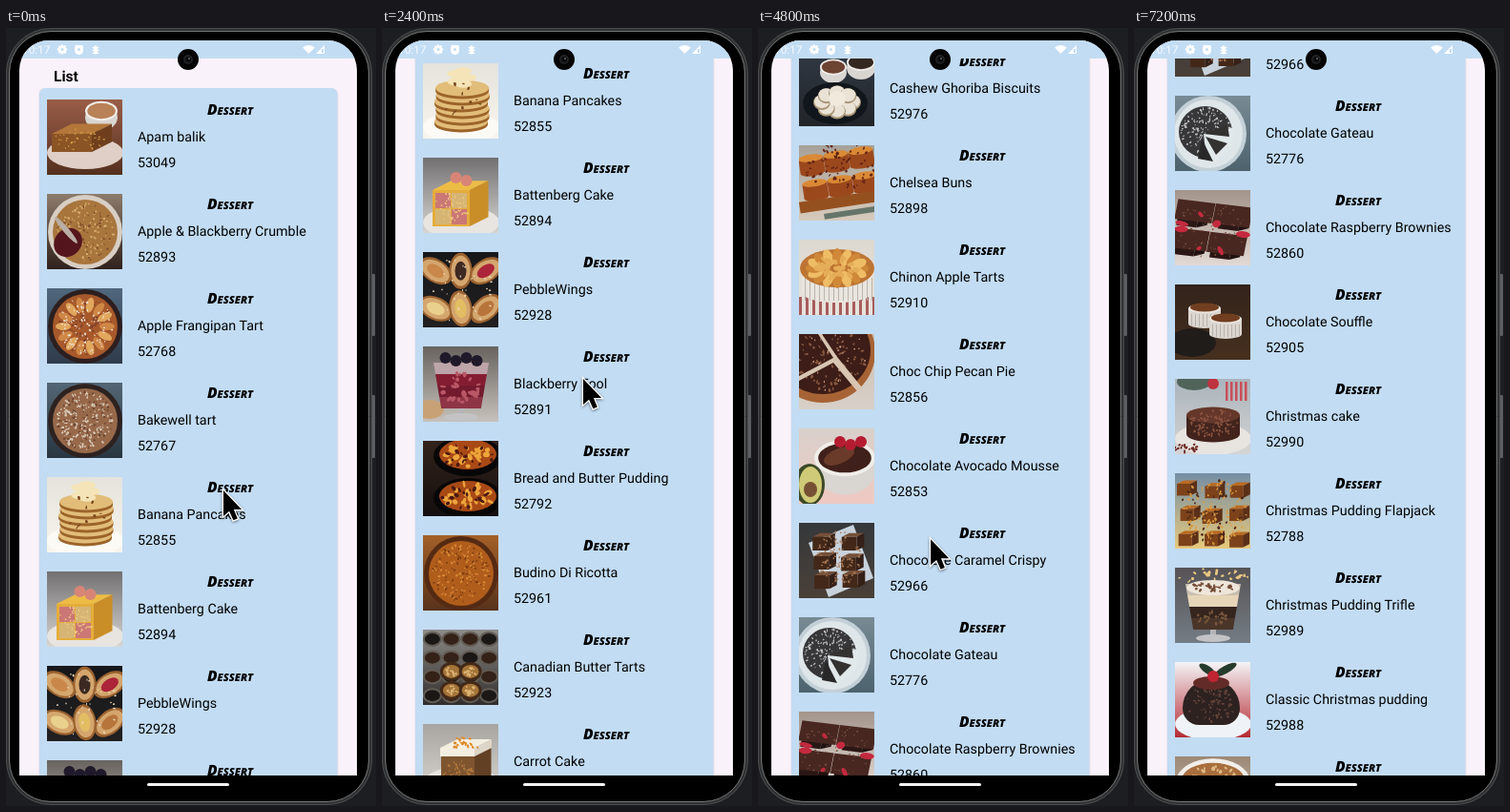
Animation, 388 px wide and 816 px high, one loop 7800 ms. Source, as an HTML page with a canvas:

```html
<!DOCTYPE html>
<html lang="en">
<head>
<meta charset="utf-8">
<title>Dessert list</title>
<style>
  html, body { margin: 0; width: 100%; height: 100%; overflow: hidden; background: #1d1e21; }
  canvas { display: block; }
</style>
</head>
<body>
<canvas id="stage" width="388" height="816"></canvas>
<script>
const ctx = document.getElementById('stage').getContext('2d');
const LOOP = 7800, STEP = 200, LAST = 7200;
const PITCH = 99, PHOTO = 79, BLUE = '#c2dcf3', WHITE = '#fff';

// Basic shapes
function box(x, y, w, h, color, r = 0) {
  ctx.fillStyle = color;
  ctx.beginPath();
  ctx.roundRect(x, y, w, h, r);
  ctx.fill();
}
function oval(x, y, rx, ry, color, turn = 0) {
  ctx.fillStyle = color;
  ctx.beginPath();
  ctx.ellipse(x, y, rx, ry, turn, 0, 7);
  ctx.fill();
}
function poly(color, ...p) {
  ctx.fillStyle = color;
  ctx.beginPath();
  for (let i = 0; i < p.length; i += 2) ctx.lineTo(p[i], p[i + 1]);
  ctx.closePath();
  ctx.fill();
}
function outline(inset, width, color) {
  ctx.strokeStyle = color;
  ctx.lineWidth = width;
  ctx.beginPath();
  ctx.roundRect(inset, inset, 384 - 2 * inset, 815 - 2 * inset, 47 - inset);
  ctx.stroke();
}

// Food parts, drawn in a square of PHOTO pixels
let seed = 1;
const random = () => (seed = seed * 16807 % 2147483647) / 2147483647;
function crumbs(n, color, size = 1.2, rx = 30, ry = rx, x = 40, y = 40) {
  while (n--) {
    const a = random() * 6.283, d = Math.sqrt(random());
    oval(x + Math.cos(a) * d * rx, y + Math.sin(a) * d * ry, size * (.5 + random()), size * (.4 + random() * .6), color, a);
  }
}
function grid(cols, rows, paint) {
  const w = PHOTO / cols, h = PHOTO / rows;
  for (let i = 0; i < cols * rows; i++) paint((i % cols + .5) * w, (Math.floor(i / cols) + .5) * h, i);
}
function ring(n, radius, paint) {
  for (let i = 0; i < n; i++) {
    const a = i / n * 6.283;
    paint(40 + Math.cos(a) * radius, 40 + Math.sin(a) * radius, a, i);
  }
}
function dish(rim, fill, speck) {
  oval(40, 40, 39, 39, rim);
  oval(40, 40, 34, 34, fill);
  crumbs(110, speck);
}
function drum(x, y, rx, h, side, top) {
  oval(x, y + h, rx, rx * .3, side);
  box(x - rx, y, rx * 2, h, side);
  oval(x, y, rx, rx * .3, top);
}
function block(x, y, w, h, front, top, side) {
  const d = w * .5, up = d * .5;
  poly(top, x, y, x + d, y - up, x + w + d, y - up, x + w, y);
  poly(side, x + w, y, x + w + d, y - up, x + w + d, y + h - up, x + w, y + h);
  box(x, y, w, h, front);
}
function pile(cols, rows, front, top, side) {
  grid(cols, rows, (x, y) => {
    const w = 42 / cols;
    block(x - w * .8 + random() * 4, y - w * .2 + random() * 4, w, w * .9, front, top, side);
  });
}
function bowl(x, y, r, fill) {
  oval(x, y + r * .4, r, r * .8, '#d9d5d1');
  oval(x, y, r, r * .6, '#f1eeea');
  oval(x, y, r * .87, r * .48, fill);
}
function glass(...layers) {
  box(37, 60, 6, 14, '#b5b5b8');
  oval(40, 74, 18, 4, '#c3c3c6');
  const h = 48 / layers.length;
  layers.forEach((color, i) => {
    const y = 17 + i * h, w = 29 - i * h * .17, narrow = w - h * .17;
    poly(color, 40 - w, y, 40 + w, y, 40 + narrow, y + h, 40 - narrow, y + h);
  });
}
const plate = (y = 60, color = '#e8e4e0') => oval(40, y, 40, 17, color);
const berries = (n, color, y) => { for (let i = 0; i < n; i++) oval(40 + (i - n / 2 + .5) * 11, y + i % 2 * 3, 6, 6, color); };

// Name, number, photo tones from top to bottom, food
const desserts = [
  ['Apam balik', 53049, '#9a5d48', '#54301e', () => {
    bowl(57, 12, 17, '#b98158'); plate(56, '#dfcfc6');
    block(5, 36, 42, 19, '#8a5425', '#b4773a', '#6f3f1d'); crumbs(40, '#d09a45', 1, 28, 12, 35, 42);
  }],
  ['Apple & Blackberry Crumble', 52893, '#8d7b6b', '#30211c', () => {
    dish('#d8cec3', '#a8753d', '#d6ad6c'); crumbs(50, '#7d4d28'); oval(22, 51, 14, 16, '#55151d', .7); oval(20, 38, 3, 18, '#b9aea5', -.7);
  }],
  ['Apple Frangipan Tart', 52768, '#50677d', '#2e3b4b', () => {
    dish('#2d1f1f', '#a8592b', '#7e4028'); ring(14, 23, (x, y, a, i) => oval(x, y, 8, 4, i % 2 ? '#e1a75d' : '#cf8746', a)); crumbs(110, '#eee1d2', 1);
  }],
  ['Bakewell tart', 52767, '#536675', '#293642', () => { dish('#2d2220', '#97694a', '#ddd0c0'); crumbs(90, '#6d432e'); crumbs(60, '#d3c2af'); }],
  ['Banana Pancakes', 52855, '#e4e3dc', '#f8f5ed', () => {
    plate(67, '#fcfaf5');
    for (let y = 61; y > 20; y -= 7) drum(40 + random() * 3, y, 28, 3, '#9c642a', '#e2bd7a');
    ring(5, 7, (x, y) => oval(x, y - 25, 9, 4, '#f4e4b7')); crumbs(14, '#77441c', 1.4, 20, 20);
  }],
  ['Battenberg Cake', 52894, '#727071', '#d7d5d2', () => {
    plate(68); block(10, 34, 39, 38, '#e4ad3b', '#edbc45', '#ca8e29');
    for (let i = 0; i < 4; i++) box(13 + i % 2 * 17, 37 + (i >> 1) * 17, 16, 16, i % 3 ? '#d6b574' : '#cb7776');
    crumbs(60, '#f0cb83', 1, 18, 16, 30, 52); berries(2, '#d88577', 21);
  }],
  ['PebbleWings', 52928, '#16171a', '#222020', () => {
    const fill = ['#c98849', '#3c2921', '#ab2439', '#e9d18d', '#e3bd63', '#b8753b'];
    grid(3, 2, (x, y, i) => { const a = i - 1; oval(x, y, 12, 19, '#9b6230', a); oval(x, y, 10, 16, '#d4a66e', a); oval(x, y, 6, 10, fill[i], a); });
    crumbs(35, '#ead9bd', 1, 36);
  }],
  ['Blackberry Fool', 52891, '#69635f', '#c7c1bc', () => {
    oval(7, 66, 15, 10, '#c8a276'); glass('#bda4a9', '#841d32', '#741a2e', '#8d3445');
    crumbs(30, '#b95766', 2.5, 20, 16, 40, 44); berries(4, '#20192a', 12);
  }],
  ['Bread and Butter Pudding', 52792, '#33221b', '#130f0e', () => {
    for (const y of [16, 60]) { oval(47, y, 36, 21, '#080707'); oval(47, y - 2, 30, 16, '#a94916'); crumbs(26, '#eda53a', 3, 27, 13, 47, y - 2); crumbs(18, '#4a1912', 2, 27, 13, 47, y); }
  }],
  ['Budino Di Ricotta', 52961, '#a46028', '#57321a', () => { dish('#552a13', '#b05d1c', '#d88a35'); crumbs(70, '#7d3b12'); }],
  ['Canadian Butter Tarts', 52923, '#8d8b87', '#302d2c', () => {
    grid(4, 4, (x, y, i) => { oval(x, y, 10, 8, '#625b54'); oval(x, y, 8, 6, i % 3 ? '#342117' : '#1b1715'); });
    grid(2, 2, (x, y) => { const cx = 20 + x / 2, cy = 34 + y / 2; oval(cx, cy, 12, 10, '#422918'); oval(cx, cy, 9, 7, '#a57438'); crumbs(12, '#dbb374', 1.5, 6, 5, cx, cy); });
  }],
  ['Carrot Cake', 52897, '#a8a4a0', '#dcd8d3', () => {
    plate(62); block(19, 33, 35, 31, '#7f5530', '#f4eee1', '#624024'); block(18, 25, 36, 9, '#f4eee1', '#f4eee1', '#ddd5c7');
    crumbs(40, '#b47a3d', 1.2, 17, 13, 37, 49); crumbs(26, '#df8b28', 1.5, 20, 6, 45, 20);
  }],
  ['Cashew Ghoriba Biscuits', 52976, '#303844', '#222528', () => {
    bowl(65, 12, 15, '#342821'); bowl(36, 17, 14, '#6d4332'); oval(38, 55, 34, 22, '#10161b');
    ring(8, 16, (x, y) => { oval(x, 30 + y * .6, 9, 8, '#a89575'); oval(x, 29 + y * .6, 8, 7, '#e9e2d5'); }); oval(40, 50, 9, 8, '#f0e9dc');
  }],
  ['Chelsea Buns', 52898, '#a6a19a', '#d7cabc', () => {
    ctx.rotate(-.15);
    grid(3, 3, (x, y, i) => { if (i < 6) drum(x - 3, y + 2, 13, 15, '#9c481d', '#da8a35'); });
    crumbs(70, '#642414', 1.5, 38, 26, 40, 28); box(-9, 59, 95, 12, '#95501f'); box(15, 75, 55, 6, '#66756a');
  }],
  ['Chinon Apple Tarts', 52910, '#ddd8d0', '#e8e3dd', () => {
    for (let x = 0; x < PHOTO; x += 7) box(x, 60, 3, 19, '#a85d5c');
    drum(40, 34, 37, 21, '#e9e5df', '#bd7433');
    for (let x = 6; x < 77; x += 5) box(x, 40, 1, 24, '#bcb4ac');
    oval(40, 30, 39, 20, '#bd7433'); ring(16, 24, (x, y, a, i) => oval(x, 10 + y * .5, 9, 5, i % 2 ? '#efbd66' : '#cf8837', a)); crumbs(35, '#e5ad58', 3, 22, 11, 40, 29);
  }],
  ['Choc Chip Pecan Pie', 52856, '#cac0b5', '#d8d0c8', () => {
    oval(25, 19, 55, 53, '#a76335'); oval(25, 17, 50, 46, '#3d1d17');
    crumbs(100, '#84563e', 1.5, 42, 36, 28, 24); crumbs(45, '#d1a28b', .9, 42, 36, 28, 24);
    poly('#d8c5b2', 0, 44, 36, 25, 20, 0, 24, 0, 40, 24, 66, 56, 61, 60, 36, 30, 0, 49);
  }],
  ['Chocolate Avocado Mousse', 52853, '#d8d0cb', '#efc9c2', () => {
    bowl(48, 31, 32, '#40201a'); oval(42, 29, 17, 8, '#6b3b2a', -.4); ctx.translate(14, 0); berries(3, '#b51c31', 14); ctx.translate(-14, 0);
    oval(11, 59, 16, 22, '#3c4826'); oval(12, 59, 12, 19, '#cfca77'); oval(12, 64, 7, 8, '#765034');
  }],
  ['Chocolate Caramel Crispy', 52966, '#35383b', '#4a4038', () => {
    poly('#c8d2dc', 10, 21, 57, 2, 78, 58, 31, 78); ctx.translate(12, 7); ctx.scale(.75, .75);
    pile(2, 3, '#432819', '#765039', '#352017'); crumbs(110, '#a97955', 1.4, 31, 38);
  }],
  ['Chocolate Gateau', 52776, '#788b95', '#4c626d', () => {
    oval(35, 40, 40, 40, '#c3d0d7'); oval(35, 40, 36, 36, '#dfe6e9'); oval(32, 38, 28, 27, '#373638'); crumbs(150, '#bdbec0', 1, 26, 24, 32, 36);
    poly('#e1e8ea', 30, 40, 63, 33, 59, 55, 40, 71, 33, 67); poly('#343131', 30, 40, 55, 30, 57, 43); poly('#343131', 32, 43, 55, 50, 43, 62); poly('#292829', 28, 45, 40, 69, 24, 66);
  }],
  ['Chocolate Raspberry Brownies', 52860, '#a3948b', '#e2d9d4', () => {
    ctx.transform(1, .12, -.15, .75, 4, 8);
    pile(2, 2, '#2a1715', '#51312a', '#1f1211'); grid(2, 2, (x, y) => box(x - 20, y - 18, 39, 28, '#482720')); crumbs(80, '#795142', 1, 38); crumbs(7, '#c4293e', 5, 36);
  }],
  ['Chocolate Souffle', 52905, '#33231a', '#46301f', () => {
    oval(18, 61, 25, 15, '#201c1a');
    for (const [x, y] of [[31, 25], [53, 36]]) {
      drum(x, y, 17, 16, '#dcd6d0', '#eee8e1'); oval(x, y - 1, 15, 4.5, '#713e20');
      for (let i = -14; i < 16; i += 4) box(x + i, y + 6, 1, 13, '#b9b2ac');
    }
  }],
  ['Christmas cake', 52990, '#a9b4bb', '#d6d4d4', () => {
    oval(20, 3, 18, 9, '#50645a'); berries(1, '#bd3340', 5);
    for (let i = 0; i < 5; i++) box(53 + i * 5, 3, 2.5, 20, '#cb4e58');
    plate(63); drum(40, 38, 28, 20, '#42241d', '#65372a'); crumbs(100, '#8d5541', 1.2, 26, 15, 40, 47); crumbs(20, '#6f2926', 1.5, 13, 5, 11, 72);
  }],
  ['Christmas Pudding Flapjack', 52788, '#758ea5', '#e6c97c', () => { pile(3, 3, '#7d421a', '#b96b24', '#5c3018'); crumbs(110, '#db9a40', 1.3, 35); crumbs(45, '#4c2818', 1.5, 35); }],
  ['Christmas Pudding Trifle', 52989, '#565355', '#737c84', () => {
    crumbs(26, '#eac782', 1.7, 38, 8, 40, 9); glass('#c9bfb0', '#e6d5b7', '#35251e', '#4a3529');
    oval(40, 21, 28, 8, '#eee6da'); crumbs(30, '#734b35', 1.5, 23, 5, 40, 20); crumbs(25, '#79583c', 1.5, 18, 7, 40, 52);
  }],
  ['Classic Christmas pudding', 52988, '#f4f5f7', '#b52a33', () => {
    plate(65, '#eff2f6'); box(8, 18, 60, 48, '#2d2220', [30, 30, 17, 17]); crumbs(90, '#65443a', 1.2, 26, 20, 38, 43);
    oval(38, 22, 19, 7, '#632b27'); oval(34, 8, 10, 4, '#263b2b', .6); oval(53, 8, 13, 4, '#263b2b', -.5); berries(1, '#c02534', 15);
  }],
  ['', '', '#9c8876', '#d1c4b4', () => { bowl(40, 25, 38, '#a86e3d'); crumbs(60, '#dfb982', 2, 29, 14, 40, 24); }]
];

// Smooth curve through rows of [seconds, value, ...]
function follow(rows, t) {
  let i = 0;
  while (i < rows.length - 2 && t > rows[i + 1][0]) i++;
  const a = rows[i], b = rows[i + 1], span = b[0] - a[0], u = (t - a[0]) / span;
  const slope = (k, c) => {
    const before = rows[k - 1], after = rows[k + 1];
    return before && after ? (after[c] - before[c]) / (after[0] - before[0]) * span : 0;
  };
  return a.slice(1).map((v, n) => {
    const d = b[n + 1] - v, p = slope(i, n + 1), q = slope(i + 1, n + 1);
    return v + u * (p + u * (3 * d - 2 * p - q + u * (p + q - 2 * d)));
  });
}
const scrollPath = [[0, 0], [1.2, 187], [2.4, 434], [4, 942], [5.4, 1459], [6.2, 1691], [7.2, 1786]];
const pointerPath = [[0, 227, 483], [1.2, 234, 261], [2.4, 210, 366], [4, 186, 498], [5.4, 175, 507], [6.2, 158, 229], [7.2, 158, 229]];

function text(str, x, y, font, color = '#000') {
  ctx.font = font;
  ctx.textRendering = 'geometricPrecision';
  ctx.fillStyle = color;
  ctx.fillText(str, x, y);
}

function drawItem([name, id, top, bottom, food], index, y) {
  ctx.save();
  ctx.translate(43, y);
  ctx.beginPath();
  ctx.rect(0, 0, PHOTO, PHOTO);
  ctx.clip();
  const tones = ctx.createLinearGradient(0, 0, 0, PHOTO);
  tones.addColorStop(0, top);
  tones.addColorStop(1, bottom);
  box(0, 0, PHOTO, PHOTO, tones);
  seed = 97 * index + 11;
  food();
  ctx.restore();
  ctx.textAlign = 'center';
  text('Dessert', 235, y + 16, 'italic small-caps 800 15.5px "Open Sans", sans-serif');
  ctx.textAlign = 'left';
  text(name, 138, y + 44, '14.3px Roboto, sans-serif');
  text(id, 138, y + 71, '14.3px Roboto, sans-serif');
}

function drawPhone() {
  box(0, 0, 388, 816, '#1d1e21');
  box(383, 258, 4, 65, '#5c5d60', 1);
  box(383, 385, 4, 66, '#5c5d60', 1);
  box(0, 0, 384, 815, '#000', 47);
  outline(2, 4, '#2f3031');
  outline(.5, 1, '#4c4d4e');
  outline(3.5, 1, '#737475');
}

function drawStatus() {
  box(14, 13, 354, 19, BLUE);
  text('10:17', 17, 27, '11.8px Roboto, sans-serif', '#f4f8fc');
  for (let i = 0; i < 8; i++) oval(59 + Math.cos(i * .785) * 4, 22.5 + Math.sin(i * .785) * 4, 1.3, 1.3, WHITE);
  oval(59, 22.5, 3.8, 3.8, WHITE);
  oval(59, 22.5, 1.6, 1.6, BLUE);
  box(72, 18, 9, 10, WHITE, [2, 2, 5, 5]);
  oval(76.5, 22.5, 1.5, 1.5, BLUE);
  oval(94, 23, 2.3, 4.5, WHITE);
  for (let y = 20; y < 27; y += 3) box(90.5, y, 7, 1, WHITE);
  ctx.beginPath();
  ctx.moveTo(317.5, 27);
  ctx.arc(317.5, 27, 9, -2.35, -.79);
  ctx.fill();
  poly(WHITE, 325, 27, 334, 18, 334, 27);
  box(331, 22, 2, 4, BLUE);
}

function drawPointer(x, y) {
  ctx.save();
  ctx.translate(x + 1, y + 2);
  ctx.scale(.87, .87);
  ctx.shadowColor = '#0006';
  ctx.shadowBlur = 3;
  ctx.shadowOffsetY = 1;
  poly('#000', 0, 0, 0, 31, 7, 25, 12, 36, 17, 34, 12.5, 23, 22, 23);
  ctx.strokeStyle = WHITE;
  ctx.lineWidth = 3;
  ctx.stroke();
  ctx.shadowColor = 'transparent';
  ctx.fill();
  ctx.restore();
}

function draw(ms) {
  const t = ms / 1000, scroll = Math.round(follow(scrollPath, t)[0]);
  drawPhone();
  ctx.save();
  ctx.beginPath();
  ctx.roundRect(14, 13, 354, 771, [31, 31, 0, 0]);
  ctx.clip();
  box(14, 13, 354, 771, '#f9f2fa');
  text('List', 50, 56 - scroll, 'bold 15.5px Roboto, sans-serif');
  ctx.save();
  ctx.shadowColor = '#0003';
  ctx.shadowBlur = 2;
  ctx.shadowOffsetY = 1;
  box(35, 63 - scroll, 312.5, 3000, BLUE, 6);
  ctx.restore();
  desserts.forEach((item, i) => {
    const y = 75 + i * PITCH - scroll;
    if (y > -PITCH && y < 784) drawItem(item, i, y);
  });
  drawStatus();
  ctx.restore();
  oval(191, 33, 11, 11, '#050505');
  oval(191, 33, 5, 5, '#202123');
  oval(191, 33, 3, 3, '#0b0c0e');
  oval(192, 32, 1, 1, '#61656a');
  box(148, 792, 86, 3, '#f4f4f4', 1.5);
  if (ms < LAST) drawPointer(...follow(pointerPath, t));
}

function tick() {
  const ms = performance.now() % LOOP;
  draw(Math.min(LAST, Math.floor(ms / STEP) * STEP));
  requestAnimationFrame(tick);
}
tick();
</script>
</body>
</html>
```
